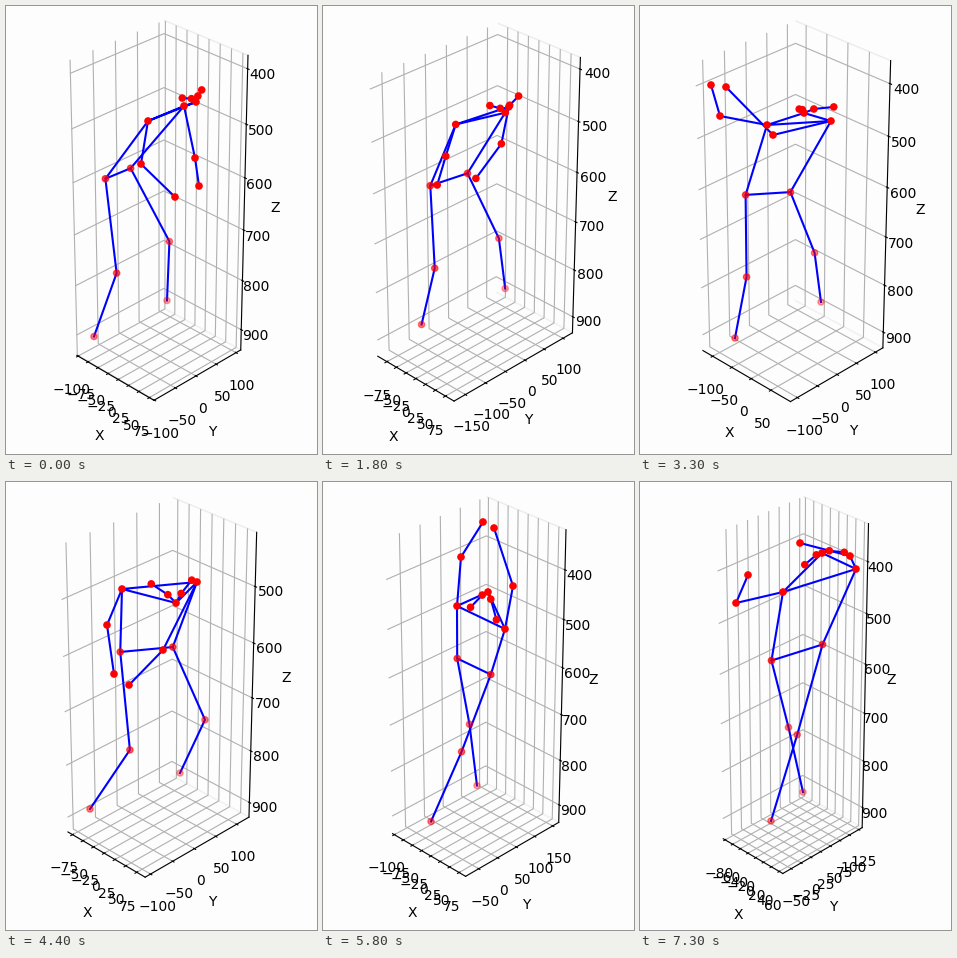
A matplotlib script that plays this animation: 311 by 448 pixels, repeating every 7.4 s.

```python
import numpy as np
import matplotlib.pyplot as plt
from matplotlib.animation import FuncAnimation
from matplotlib.ticker import MultipleLocator

W, H, DPI = 311, 448, 100
FRAMES, STEP_MS = 74, 100
PAPER = "#fdfdfd"

# Dance key poses; points are x + yj in stage pixels
AT = np.array([0, 10, 25, 33, 44, 58, 73])
BODY = dict(
    chest=[160+107.5j, 147+106j, 169+113.5j, 159+117j, 153.5+103.5j,
           158+135.5j, 179.5+98.5j],
    span=[36-15j, 52-38j, 54+1j, 64-4j, 75-7j, 48+23j, 73-23j],
    pelvis=[112+167.5j, 106.5+172.5j, 140+176j, 128+187.5j, 140.5+167.5j,
            151+184.5j, 157+170.5j],
    feet=[124.5+312.5j, 123.5+311.5j, 151.5+295.5j, 138+314j, 129+309j,
          131+321.5j, 147+324.5j],
    stride=[36.5, 43, 40.5, 43, 45, -23, -16],
    bend=[18, 11, 9, 7, 28, 2, 1],
    nose=[190+96j, 176+115j, 185+99j, 164+107j, 170+121j, 165+110j, 182+71j],
    skull=[186+88j, 168.5+94.5j, 191+95.5j, 176.5+102j, 165.5+100j,
           160.5+131.5j, 184.5+76.5j],
    elbow_r=[135+158j, 139+177j, 104+123j, 80+110j, 101+143j, 138+75j,
             96+121j],
    hand_r=[169+191j, 166+216j, 72+134j, 71+79j, 108+192j, 160+40j, 108+93j],
    elbow_l=[189+152j, 173+149j, 176+129j, 133+129j, 157+168j, 190+104j,
             210+74j],
    hand_l=[193+180j, 173+210j, 130+128j, 86+81j, 123+203j, 171+46j, 160+61j],
)
LIMITS = dict(
    x0=[-103, -102, -102, -126, -86, -105, -85],
    x1=[86, 102, 91, 98.5, 94, 92, 69],
    y0=[-101, -97.5, -222, -117, -112, -84, -71],
    y1=[112, 118, 129, 120, 130, 167, 134],
    z0=[376, 385, 369, 357, 407, 321, 329],
    z1=[942, 934, 936, 934, 929, 940, 944],
)

# Each chain is a run of joint names joined by bones
CHAINS = ["ear_r eye_r nose eye_l ear_l",
          "sho_r nose sho_l sho_r",
          "sho_r elbow_r hand_r", "sho_l elbow_l hand_l",
          "sho_r hip_r hip_l sho_l",
          "hip_r knee_r foot_r", "hip_l knee_l foot_l"]
JOINTS = sorted({name for chain in CHAINS for name in chain.split()})
FADE = dict(hip=0.7, knee=0.5, foot=0.35)


def tween(keys, n, pull=0.7):
    """Smooth cubic path through the keys."""
    keys = np.array(keys, dtype=complex)
    slope = pull * np.gradient(keys, AT)
    i = int(np.clip(np.searchsorted(AT, n, side="right") - 1, 0, len(AT) - 2))
    gap = AT[i + 1] - AT[i]
    u = (n - AT[i]) / gap
    ease = u * u * (3 - 2 * u)
    return (keys[i] * (1 - ease) + keys[i + 1] * ease
            + gap * u * (1 - u) * ((1 - u) * slope[i] - u * slope[i + 1]))


def knee(hip, foot, bend):
    """A bent knee sits lower on the leg and off its line."""
    leg = foot - hip
    drop = 0.5 + 0.01 * min(bend, 9)
    return hip + drop * leg - 1j * bend * leg / abs(leg)


def pose(n):
    p = {name: tween(keys, n) for name, keys in BODY.items()}
    stride, bend = p["stride"].real, p["bend"].real
    step = stride + 18j * np.clip(-stride / 20, -1, 1)
    for tag, sign in (("_r", -1), ("_l", 1)):
        turn = sign * p["span"]
        p["sho" + tag] = p["chest"] + turn / 2
        p["hip" + tag] = p["pelvis"] + 0.35 * turn
        p["ear" + tag] = p["skull"] + 0.27 * turn
        p["eye" + tag] = p["nose"] + 0.33 * (p["ear" + tag] - p["nose"]) - 2j
        p["foot" + tag] = p["feet"] + sign * step
        p["knee" + tag] = knee(p["hip" + tag], p["foot" + tag], bend)
    return p


def alpha(name, p):
    """Low joints fade, the leg further back a little more."""
    part, _, tag = name.partition("_")
    if part not in FADE:
        return 1
    other = p[part + ("_l" if tag == "r" else "_r")]
    return FADE[part] + 0.004 * np.clip((p[name] - other).imag, 0, 50)


def tick_step(lo, hi):
    for step in (20, 25, 50):
        if (hi - lo) * 0.96 <= 8 * step:
            return step
    return 100


fig = plt.figure(figsize=(W / DPI, H / DPI), dpi=DPI, facecolor=PAPER)
side = 369.6
ax = fig.add_axes([-36.8 / W, 52.8 / H, side / W, side / H], projection="3d",
                  facecolor="none")
ax.view_init(elev=30, azim=-45)
ax.set(xlabel="X", ylabel="Y", zlabel="Z")
ax.zaxis.set_major_locator(MultipleLocator(100))
for axis, edge in ((ax.xaxis, PAPER), (ax.yaxis, "#ececec"),
                   (ax.zaxis, "#f2f2f2")):
    axis.set_pane_color(PAPER)
    axis.pane.set_edgecolor(edge)

stage = fig.add_axes([0, 0, 1, 1], zorder=5)
stage.set_xlim(0, W)
stage.set_ylim(H, 0)
stage.axis("off")
lines = [stage.plot([], [], color="b", lw=1.5)[0] for _ in CHAINS]
dots = stage.scatter([0] * len(JOINTS), [0] * len(JOINTS), s=20, color="r",
                     linewidths=1, zorder=3)


def draw(n):
    x0, x1, y0, y1, z0, z1 = (tween(k, n).real for k in LIMITS.values())
    ax.set_xlim(x0, x1)
    ax.set_ylim(y0, y1)
    ax.set_zlim(z1, z0)
    ax.set_box_aspect((x1 - x0, y1 - y0, z1 - z0))
    ax.xaxis.set_major_locator(MultipleLocator(tick_step(x0, x1)))
    ax.yaxis.set_major_locator(MultipleLocator(tick_step(y0, y1)))

    p = pose(n)
    for line, chain in zip(lines, CHAINS):
        path = np.array([p[name] for name in chain.split()])
        line.set_data(path.real, path.imag)
    rgba = [(1, 0, 0, alpha(name, p)) for name in JOINTS]
    dots.set_offsets([(p[name].real, p[name].imag) for name in JOINTS])
    dots.set_facecolor(rgba)
    dots.set_edgecolor(rgba)
    return [*lines, dots]


anim = FuncAnimation(fig, draw, frames=FRAMES, init_func=lambda: draw(0),
                     interval=STEP_MS, repeat=True, repeat_delay=0,
                     blit=False)
plt.show()
```
